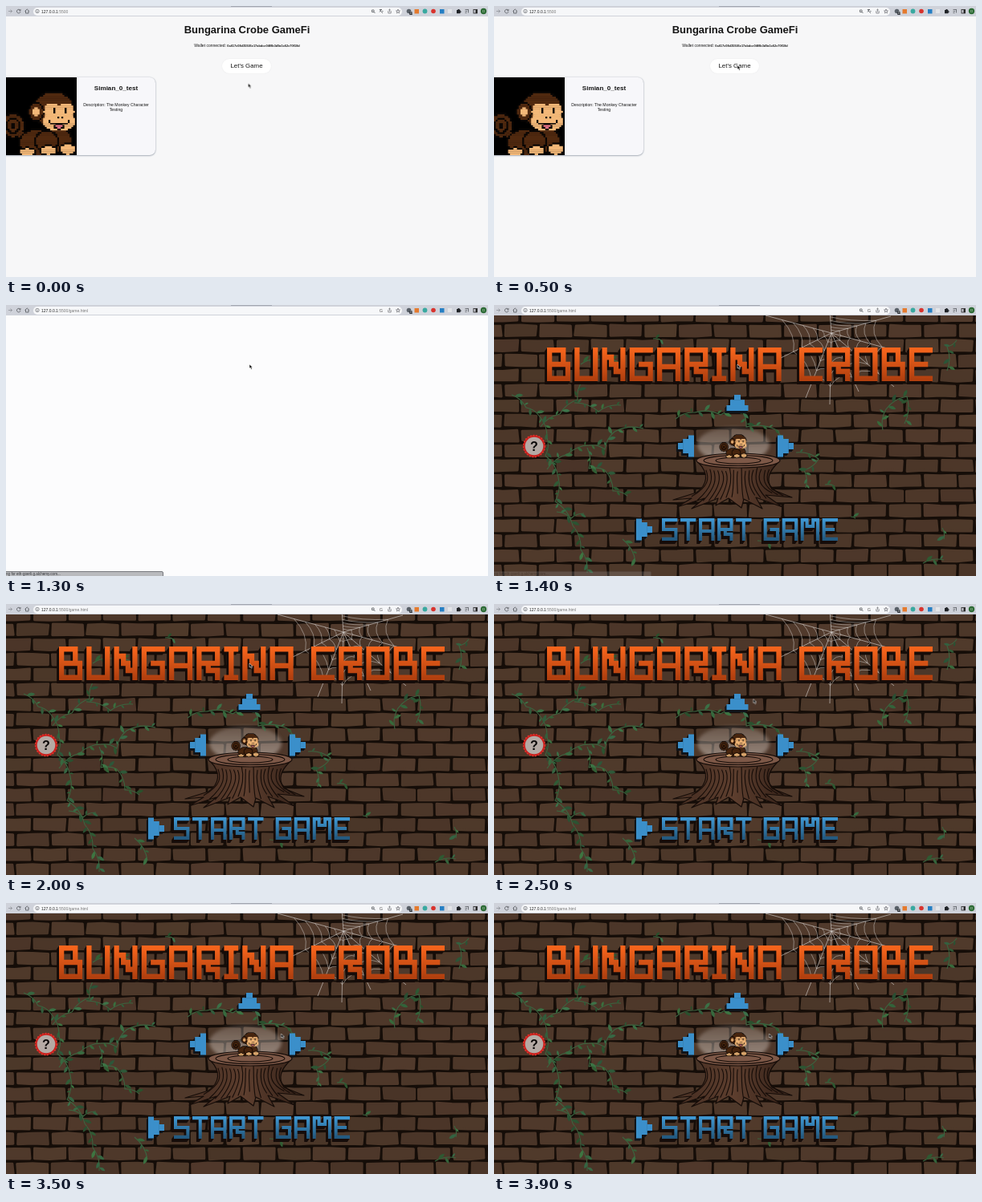
Write an HTML page with a canvas that moves like this. It is 600 px wide and 338 px high and loops after 4 s.

```html
<!DOCTYPE html>
<html lang="en">
<head>
<meta charset="utf-8">
<title>Game launch</title>
<style>
  html, body { margin: 0; width: 100%; height: 100%; overflow: hidden; }
  body { position: relative; background: #fcfcfd; color: #151515; font-family: "Liberation Sans", Arial, sans-serif; }
  body > *, #page > *, #card > *, #bar > * { position: absolute; box-sizing: border-box; }
  #page { inset: 0; background: #f7f7f8; }
  .mid { left: 0; width: 600px; text-align: center; white-space: nowrap; }
  h1, h2, p { margin: 0; }
  h1 { top: 22px; font-size: 13px; line-height: 16px; }
  #wallet { top: 45px; font-size: 5px; line-height: 8px; }
  #wallet b { font-size: 3.9px; }
  #go { left: 269px; top: 66px; width: 61px; height: 18px; border-radius: 9px; background: #fff;
    box-shadow: 0 0 2px #0001; font-size: 7.9px; line-height: 18px; text-align: center; }
  #card { left: -8px; top: 89px; width: 194px; height: 97px; border-radius: 7px; background: #f7f7fa;
    box-shadow: 0 .5px 2px #7d8796; overflow: hidden; }
  #face { left: 8px; top: 0; }
  h2 { left: 96px; top: 8px; width: 98px; font-size: 8.1px; line-height: 11px; text-align: center; }
  #about { left: 96px; top: 31px; width: 98px; font-size: 5.2px; line-height: 6px; text-align: center; }
  #game { inset: 0; }
  #status { left: -1px; top: 332px; width: 197px; height: 7px; border: 1px solid #77797e; border-radius: 0 2px 0 0;
    background: #b9babd; color: #34363a; font-size: 4.6px; line-height: 5.5px; white-space: nowrap; }
  #bar { left: 0; top: 0; width: 600px; height: 12.5px; background: #cfd2da; }
  #tab { left: 280px; top: 0; width: 51px; height: 1px; background: #a4a8b2; }
  #pill { left: 34px; top: 1.5px; width: 459px; height: 10px; border-radius: 5px; background: #f6f7f9; }
  #url { left: 44px; top: 2.5px; font-size: 5px; line-height: 8px; color: #222; white-space: nowrap; }
  #url span { color: #777; }
  #bar svg { left: 0; top: 0; }
</style>
</head>
<body>
<div id="page">
  <h1 class="mid">Bungarina Crobe GameFi</h1>
  <p class="mid" id="wallet">Wallet connected: <b>0x417c08d35926e17abdce04f8b3d9a5c62e70f18d</b></p>
  <div id="go">Let's Game</div>
  <div id="card">
    <canvas id="face" width="88" height="97"></canvas>
    <h2>Simian_0_test</h2>
    <p id="about">Description: The Monkey Character Testing</p>
  </div>
</div>
<canvas id="game" width="600" height="338"></canvas>
<div id="status">ng for eth-goerli.g.alchemy.com...</div>
<div id="bar">
  <i id="tab"></i><i id="pill"></i>
  <div id="url">127.0.0.1<span>:5500<span id="path">/game.html</span></span></div>
  <svg width="600" height="13" fill="none" stroke="#54575c" stroke-width=".8">
    <path d="M3 6.5H7.5M5.5 4.5L7.5 6.5L5.5 8.5" stroke="#8d9096"/>
    <path id="reload" d="M17.8 5.5A2.3 2.3 0 1 0 18 7.2M18 4V5.8H16.2"/>
    <path id="stop" d="M13.8 4.5L17.8 8.5M17.8 4.5L13.8 8.5"/>
    <path d="M23.5 6.5L26.2 4L28.9 6.5M24.5 6V9H28V6"/>
    <circle cx="39" cy="6.5" r="2.2" stroke-width=".6"/><path d="M39 6V8M39 5V5.4" stroke-width=".6"/>
    <path id="key" d="M455.5 5H458V7.5H455.5ZM457.5 7L459.5 9"/>
    <path id="lens" d="M464.8 4.5H468M466.4 4V5M467.5 4.5L465 7.5M465.5 5.5L469 9M468 6.5H469.5"/>
    <text id="letter" x="464.8" y="8.5" font-size="5.5" stroke="none" fill="#555">G</text>
    <path d="M475.8 6V9H479.2V6M477.5 7.5V4L476.3 5M477.5 4L478.7 5" stroke-width=".6"/>
    <path d="M488 4L488.700 6H490.500L489 7.100L489.600 9L488 7.900L486.400 9L487 7.100L485.500 6H487.300Z" stroke-width=".6"/>
    <g stroke="none">
      <circle cx="501.500" cy="6.500" r="2.800" fill="#596068"/><rect x="502" y="7" width="4" height="4" rx="1" fill="#2c3037"/>
      <text x="502.500" y="10.200" font-size="3" fill="#fff">19</text>
      <rect x="508.500" y="4" width="5.500" height="5.500" fill="#e47a2e"/>
      <circle cx="521.500" cy="6.500" r="2.900" fill="#39a9a0"/>
      <circle cx="532" cy="6.500" r="2.800" fill="#d9332e"/>
      <rect x="540" y="4" width="5.500" height="5.500" fill="#267fc4"/>
      <rect x="550" y="4" width="5" height="5" fill="#e3e5e8"/>
      <path d="M561 5H562.500V4H564.500V5H565.500V6.500H566.500V8H565.500V9.200H561Z" fill="#202327"/>
      <circle cx="594.500" cy="6.500" r="3.700" fill="#2c6a35"/>
      <text x="593.200" y="8" font-size="4" fill="#cfe4c9">D</text>
    </g>
    <path d="M571.500 4.500H576M571.500 6.500H574M571.500 8.500H573.500M575.500 5V8.500"/>
    <rect x="582" y="4.500" width="4.500" height="4.500" stroke="#222"/><path d="M585.500 4.500V9" stroke="#222" stroke-width="2"/>
  </svg>
</div>
<svg id="cursor" width="8" height="9" style="left:-1px;top:-1px"><path d="M1 1V6L2.200 5L3.200 7.200L4.300 6.700L3.400 4.700H5Z" fill="#111" stroke="#fff" stroke-width=".5"/></svg>

<script>
const $ = id => document.getElementById(id);
const LOOP = 4000;

// ---- drawing helpers ----
let seed = 17;
const rnd = () => (seed = seed * 16807 % 2147483647) / 2147483647;
const g = $('game').getContext('2d');

function blob(c, cx, cy, rx, ry, fill, edge) {
  if (edge) blob(c, cx, cy, rx + 2.2, ry + 2.2, '#080504');
  const s = 2.2;
  c.fillStyle = fill;
  for (let y = Math.round((cy - ry) / s) * s; y < cy + ry; y += s) {
    const d = (y + s / 2 - cy) / ry;
    if (Math.abs(d) >= 1) continue;
    const w = Math.round(rx * Math.sqrt(1 - d * d) / s) * s;
    c.fillRect(Math.round(cx / s) * s - w, y, w * 2, s + .2);
  }
}

function monkey(c) {
  const fur = '#50290f', skin = '#f3b878', ink = '#080504';
  const block = (x, y, w, h, fill) => { c.fillStyle = fill; c.fillRect(x, y, w, h); };
  blob(c, 9, 60, 13, 14, fur, true);
  blob(c, 9, 60, 9, 10, ink);
  blob(c, 9, 60, 6.6, 7.5, fur);
  blob(c, 9, 61, 3, 3.5, ink);
  blob(c, 24, 73, 9, 5, fur);
  blob(c, 40, 81, 22, 15, fur, true);
  blob(c, 27, 93, 9, 4, skin, true);
  blob(c, 66, 78, 15, 14, fur, true);
  blob(c, 51, 80, 13, 12, fur, true);
  blob(c, 53, 91, 9, 5, skin, true);
  blob(c, 76, 90, 9, 6, skin, true);
  blob(c, 59, 40, 24, 21, fur, true);
  blob(c, 37, 43, 8, 10, fur, true);
  blob(c, 38, 43, 4.5, 6, skin);
  blob(c, 57, 43, 10, 11, skin);
  blob(c, 75, 43, 10, 11, skin);
  blob(c, 66, 55, 20, 12, skin);
  block(59, 38, 2.4, 7, ink);
  block(73, 38, 2.4, 7, ink);
  block(64, 49, 2.2, 2.2, ink);
  block(69, 49, 2.2, 2.2, ink);
  block(53, 53, 2.2, 4, ink);
  block(55, 57, 22, 1.5, ink);
  block(77, 53, 2.2, 4, ink);
  blob(c, 65, 61, 4.4, 2.2, '#df6f83', true);
}

const face = $('face').getContext('2d');
face.fillRect(0, 0, 88, 97);
monkey(face);

// ---- wall ----
function wall() {
  g.fillStyle = '#150d08';
  g.fillRect(0, 0, 600, 338);
  g.lineJoin = 'round';
  g.lineWidth = 3;
  const w = 43.5, h = 18.7, wob = () => (rnd() - .5) * 1.6;
  for (let r = 0; r < 19; r++) {
    for (let x = (r % 2 ? -32 : -11) - w; x < 600; x += w) {
      const y = 4 + r * h, a = x + 3, b = x + w - 3, t = y + 3, u = y + h - 3;
      g.fillStyle = g.strokeStyle = `hsl(${22 + rnd() * 3} 30% ${22 + rnd() * 2.5}%)`;
      g.beginPath();
      g.moveTo(a + wob(), t + wob());
      g.lineTo((a + b) / 2, t + wob());
      g.lineTo(b + wob(), t + wob());
      g.lineTo(b + wob(), u + wob());
      g.lineTo((a + b) / 2, u + wob());
      g.lineTo(a + wob(), u + wob());
      g.closePath();
      g.fill();
      g.stroke();
    }
  }
}

// ---- vines: points along each stem ----
const vines = [
  [22, 112, 40, 128, 56, 138, 66, 165, 64, 188, 80, 215, 76, 245, 98, 275, 108, 305, 116, 334],
  [58, 152, 82, 136, 104, 118, 110, 95],
  [100, 122, 130, 133, 158, 125],
  [66, 205, 92, 186, 118, 175, 138, 180, 150, 158, 186, 154],
  [116, 178, 118, 204, 138, 206, 148, 232, 166, 238],
  [78, 258, 96, 266, 112, 260],
  [108, 74, 130, 68, 158, 73],
  [198, 42, 210, 45],
  [226, 142, 250, 134, 282, 137, 308, 132, 314, 152, 354, 157, 354, 174],
  [376, 184, 404, 192, 386, 206, 388, 228],
  [484, 156, 488, 130, 514, 114, 511, 148],
  [576, 44, 564, 52, 564, 82],
  [328, 294, 345, 300], [160, 292, 176, 320], [534, 322, 560, 318], [558, 278, 560, 292],
  [412, 224, 424, 226], [444, 264, 450, 266]
];

function leaf(x, y, a, size) {
  g.fillStyle = `hsl(${122 + rnd() * 16} 31% ${23 + rnd() * 12}%)`;
  g.save();
  g.translate(x, y);
  g.rotate(a);
  g.beginPath();
  g.moveTo(0, 0);
  g.quadraticCurveTo(size / 2, -size * .45, size, 0);
  g.quadraticCurveTo(size / 2, size * .35, 0, 0);
  g.fill();
  g.restore();
}

function vine(p) {
  g.strokeStyle = '#3c6540';
  g.lineWidth = 1.1;
  g.beginPath();
  g.moveTo(p[0], p[1]);
  for (let i = 2; i < p.length; i += 2) {
    const [x, y, u, v] = p.slice(i - 2, i + 2);
    g.quadraticCurveTo((x + u) / 2 + (v - y) * .2, (y + v) / 2 - (u - x) * .2, u, v);
  }
  g.stroke();
  let side = 1;
  for (let i = 2; i < p.length; i += 2) {
    const [x, y, u, v] = p.slice(i - 2, i + 2), n = Math.ceil(Math.hypot(u - x, v - y) / 10);
    for (let k = 0; k < n; k++) {
      const f = (k + .5) / n, bow = .4 * f * (1 - f);
      side = -side;
      leaf(x + (u - x) * f + (v - y) * bow, y + (v - y) * f - (u - x) * bow,
        Math.atan2(v - y, u - x) + side * (.5 + rnd() * .7), 5 + rnd() * 6);
    }
  }
}

function web() {
  const cx = 420, cy = 35;
  const ends = [[338, 13], [357, 66], [388, 116], [418, 124], [454, 108], [498, 102], [504, 58], [494, 14], [418, 8]];
  g.strokeStyle = '#d5d0cca0';
  g.lineWidth = 1;
  g.beginPath();
  for (const [x, y] of ends) { g.moveTo(cx, cy); g.lineTo(x, y); }
  g.stroke();
  g.lineWidth = .8;
  for (const f of [.14, .28, .43, .58, .75]) {
    g.beginPath();
    ends.forEach(([x, y], i) => {
      const px = cx + (x - cx) * f, py = cy + (y - cy) * f;
      if (!i) return g.moveTo(px, py);
      const [a, b] = ends[i - 1];
      g.quadraticCurveTo(cx + ((x + a) / 2 - cx) * f * .8, cy + ((y + b) / 2 - cy) * f * .8, px, py);
    });
    g.stroke();
  }
}

// ---- block lettering: width and stroke path on a grid six units tall ----
const glyphs = {
  A: [4, 'M0 6V0H4V6M0 3.5H4'], B: [4, 'M0 0H3V3H4V6H0ZM0 3H3'], C: [4, 'M4 0H0V6H4'],
  E: [4, 'M4 0H0V6H4M0 3H3'], G: [4, 'M4 0H0V6H4V3H2'], I: [2, 'M0 0H2M1 0V6M0 6H2'],
  M: [5, 'M0 6V0H1.5V2H3.5V0H5V6'], N: [4, 'M0 6V0M4 0V6M0 1.5H1.5V3H2.5V4.5H4'],
  O: [4, 'M0 0H4V6H0Z'], R: [4, 'M0 6V0H4V3H0M2 3V4.5H4V6'], S: [4, 'M4 0H0V3H4V6H0'],
  T: [4, 'M0 0H4M2 0V6'], U: [4, 'M0 0V6H4V0'], ' ': [1, '']
};

// Repeats a shape as a dark block shadow, then draws its face.
function extrude(depth, draw) {
  for (let i = depth; i >= 0; i--) {
    g.save();
    g.translate(-i * .7, i);
    draw(i > 0);
    g.restore();
  }
}

function word(text, x, y, w, h, weight, top, bottom) {
  const units = [...text].reduce((n, ch) => n + glyphs[ch][0] + 2, weight - 2);
  extrude(4, dark => {
    g.translate(x, y);
    g.scale(w / units, h / (6 + weight));
    g.translate(weight / 2, weight / 2);
    const fill = g.createLinearGradient(0, 0, 0, 6);
    fill.addColorStop(0, top);
    fill.addColorStop(1, bottom);
    g.strokeStyle = dark ? '#160c09' : fill;
    g.lineWidth = weight;
    g.lineJoin = 'miter';
    g.lineCap = 'square';
    for (const ch of text) {
      g.stroke(new Path2D(glyphs[ch][1]));
      g.translate(glyphs[ch][0] + 2, 0);
    }
  });
}

function arrow(x, y, angle) {
  extrude(3, dark => {
    g.translate(x, y);
    g.rotate(angle);
    g.fillStyle = dark ? '#10141a' : '#3b8fca';
    g.fillRect(-10, -13.5, 7, 27);
    g.fillRect(-3.2, -9, 7, 18);
    g.fillRect(3.5, -4, 6.5, 8);
  });
}

function stump() {
  g.save();
  g.filter = 'blur(2px)';
  const glow = g.createLinearGradient(0, 150, 0, 196);
  glow.addColorStop(0, '#d8cec730');
  glow.addColorStop(1, '#d8cec790');
  g.fillStyle = glow;
  g.beginPath();
  g.ellipse(298, 174, 45, 22, 0, 0, 7);
  g.fill();
  g.restore();
  const bark = g.createLinearGradient(250, 0, 358, 0);
  bark.addColorStop(0, '#4c3225');
  bark.addColorStop(.45, '#5d3e2e');
  bark.addColorStop(1, '#38241a');
  g.fillStyle = bark;
  g.strokeStyle = '#150c08';
  g.lineJoin = 'round';
  g.lineCap = 'round';
  g.lineWidth = 1.2;
  const body = new Path2D('M254 196C268 210 266 224 252 234L223 243L246 241L228 252L262 241L246 254L279 241L276 250L292 241L308 253L311 242L334 254L326 240L359 252L338 237L371 240L346 230C338 218 342 208 354 196Z');
  g.fill(body);
  g.stroke(body);
  g.lineWidth = 1.1;
  for (let i = 0; i < 17; i++) {
    const x = 264 + i * 4.9, lean = i - 8;
    g.beginPath();
    g.moveTo(x, 203 + rnd() * 5);
    g.bezierCurveTo(x - lean * .5 + rnd() * 6 - 3, 216, x - lean * .5, 226, x + lean * 2.2, 234 + rnd() * 10);
    g.stroke();
  }
  g.fillStyle = '#7d5847';
  for (const [rx, ry] of [[52, 9], [43, 6.5], [28, 4]]) {
    g.beginPath();
    g.ellipse(304, 194, rx, ry, 0, 0, 7);
    if (rx > 50) g.fill();
    g.stroke();
  }
  g.save();
  g.translate(283, 155);
  g.scale(.365, .365);
  monkey(g);
  g.restore();
}

function help() {
  const ring = (r, fill) => { g.fillStyle = fill; g.beginPath(); g.arc(50, 176, r, 0, 7); g.fill(); };
  ring(13.4, '#c9201d');
  g.strokeStyle = '#e0302a';
  g.lineWidth = 1.6;
  g.lineCap = 'butt';
  g.setLineDash([2, 1.6]);
  g.stroke();
  g.setLineDash([]);
  ring(11.3, '#b5aaa5');
  g.fillStyle = '#0c0909';
  g.font = 'bold 16px "Liberation Sans", sans-serif';
  g.textAlign = 'center';
  g.fillText('?', 50, 181.8);
}

wall();
vines.forEach(vine);
web();
word('BUNGARINA CROBE', 66, 53, 480, 42, 1.1, '#f5641c', '#b2400f');
arrow(303, 122, -Math.PI / 2);
arrow(239, 176, Math.PI);
arrow(363, 176, 0);
stump();
help();
arrow(187, 280, 0);
word('START GAME', 209, 266, 219, 28, 1.05, '#3f97d2', '#23597f');

// ---- timeline: rows of [ms, value, easing until the next row] ----
function play(id, prop, rows) {
  const frames = rows.map(([ms, value, easing = 'step-end']) => ({ offset: ms / LOOP, [prop]: value, easing }));
  frames.push({ offset: 1, [prop]: rows[rows.length - 1][1] });
  $(id).animate(frames, { duration: LOOP, iterations: Infinity });
}

play('page', 'opacity', [[0, 1], [1300, 0]]);
play('game', 'opacity', [[0, 0], [1400, 1]]);
play('status', 'opacity', [[0, 0], [700, 1], [1400, .2], [1500, 0]]);
play('path', 'opacity', [[0, 0], [700, 1]]);
play('reload', 'opacity', [[0, 1], [700, 0], [1300, 1]]);
play('stop', 'opacity', [[0, 0], [700, 1], [1300, 0]]);
play('key', 'opacity', [[0, 1], [700, 0], [1400, 1]]);
play('lens', 'opacity', [[0, 1], [700, 0]]);
play('letter', 'opacity', [[0, 0], [700, 1]]);
play('cursor', 'transform', [
  [0, 'translate(301.5px, 96.5px)', 'steps(5)'],
  [500, 'translate(303px, 74px)'],
  [2200, 'translate(303px, 74px)', 'steps(6)'],
  [2800, 'translate(342.5px, 163px)']
]);
</script>
</body>
</html>
```
